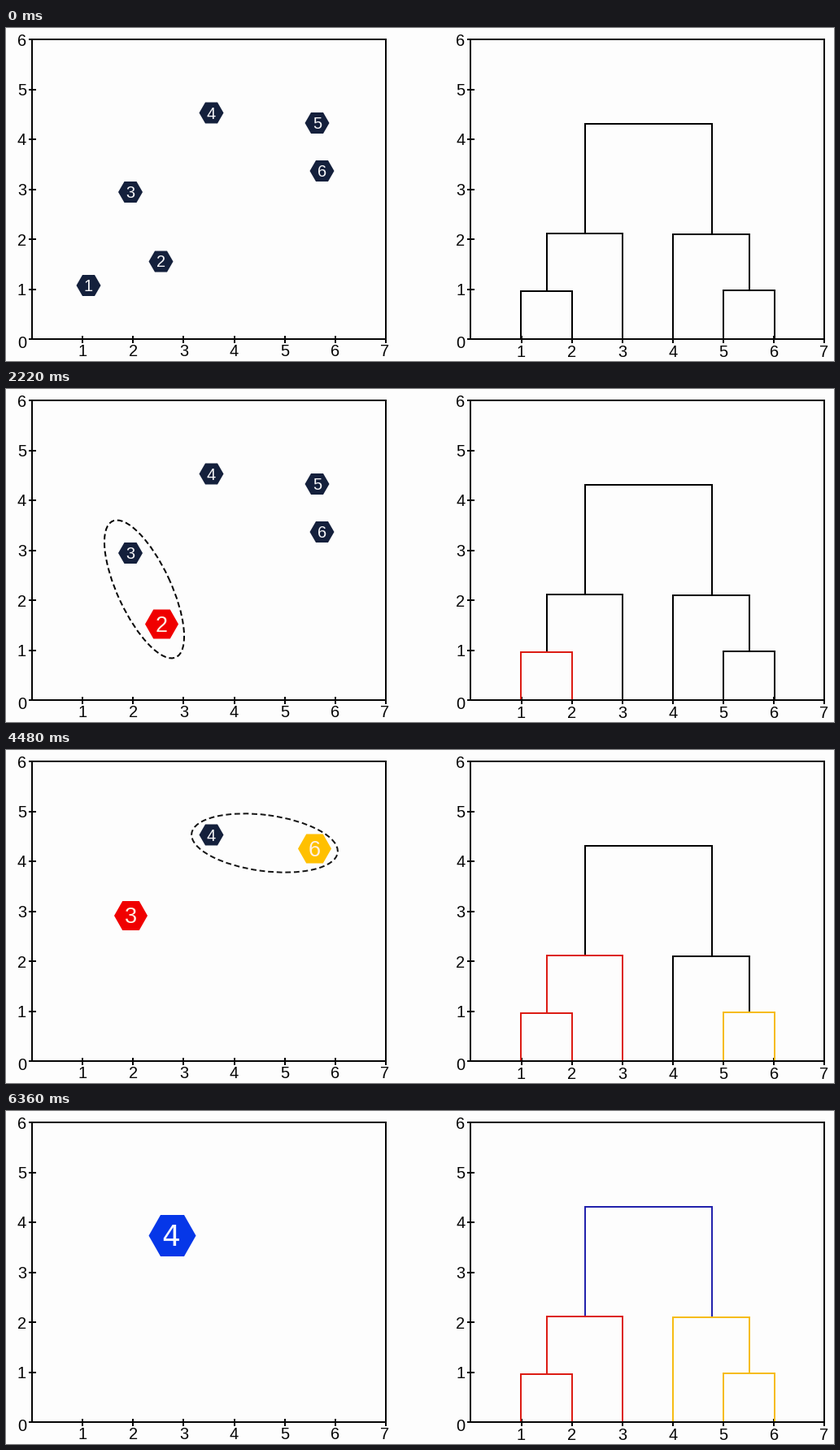
These frames come from a looping animation (1018 px wide and 410 px high, 6.96 s). A matplotlib script:

```python
import numpy as np
import matplotlib.pyplot as plt
from matplotlib.animation import FuncAnimation
from matplotlib.colors import to_rgb
from matplotlib.patches import Ellipse, Polygon

W, H, DPI = 1018, 410, 64
STEP, LOOP = 20, 6960
PX = 72 / DPI  # points per pixel

PAPER, INK = "#fdfdfd", "#050505"
DARK, RED, ORANGE, BLUE = "#14203c", "#f00000", "#ffc000", "#0637e8"
RED_LINE, ORANGE_LINE, BLUE_LINE = "#dc1c14", "#f6bc14", "#2222ac"

# (start, end) in ms
RINGS_IN = [(680, 1000), (1880, 2220), (3060, 3360), (4200, 4500), (5360, 5680)]
MERGES = [(1180, 1860), (2360, 3040), (3500, 4180), (4640, 5240), (5860, 6360)]

fig = plt.figure(figsize=(W / DPI, H / DPI), dpi=DPI, facecolor=PAPER)
ax = fig.add_axes([0, 0, 1, 1])
ax.set_xlim(0, W)
ax.set_ylim(H, 0)
ax.axis("off")


def label(x, y, text, size, color, z=2, font="Liberation Sans"):
    return ax.text(x, y + 0.35 * size, text, fontsize=size * PX, color=color,
                   family=font, ha="center", va="baseline", zorder=z)


def chart_frame(left, x_label_y):
    right, top, bottom = left + 435, 14, 383
    xs, ys = [left, right, right, left, left], [top, top, bottom, bottom, top]
    for k in range(7):
        y = bottom - 61.5 * k
        xs += [np.nan, left - 4, left + 5]
        ys += [np.nan, y, y]
        label(left - 12.5, y + (4 if k == 0 else 0.5), str(k), 20, INK)
    for k in range(1, 8):
        x = left + 62.15 * k
        xs += [np.nan, x, x]
        ys += [np.nan, bottom - 4, bottom + 5]
        label(x - (1 if k == 7 else 0), x_label_y, str(k), 20, INK)
    ax.plot(xs, ys, color=INK, lw=2 * PX, solid_capstyle="butt",
            solid_joinstyle="miter", zorder=1)


def bracket(x0, y0, top, x1, y1, z):
    return ax.plot([x0, x0, x1, x1], [y0, top, top, y1], color="black",
                   lw=2 * PX, solid_joinstyle="miter",
                   solid_capstyle="butt", zorder=z)[0]


class Hexagon:
    def __init__(self, x, y, text, born, dies, color=DARK, size=(30, 26),
                 font_px=20, ink="#f8f8fa", font="Liberation Sans", dx=0):
        w, h = size[0] / 2, size[1] / 2
        z = 4 if born is None else 6 + born
        corners = [(x - w, y), (x - w / 2, y - h), (x + w / 2, y - h),
                   (x + w, y), (x + w / 2, y + h), (x - w / 2, y + h)]
        self.parts = [ax.add_patch(Polygon(corners, fc=color, ec="none", zorder=z)),
                      label(x + dx, y, text, font_px, ink, z + 0.5, font)]
        self.born, self.dies = born, dies

    def update(self, prog):
        alpha = 1 if self.born is None else fade_in(prog[self.born])
        if self.dies is not None:
            alpha *= fade_out(prog[self.dies])
        show(self.parts, alpha)


def big(x, y, text, born, dies, color):
    return Hexagon(x, y, text, born, dies, color, (41, 36), 27, "#fff0e4")


def ring(x, y, a, b, angle):
    return ax.add_patch(Ellipse((x, y), 2 * a, 2 * b, angle=angle, fill=False,
                                ec=INK, lw=2 * PX, ls=(0, (3.4, 1.9)), zorder=3))


def show(parts, alpha):
    for p in parts:
        p.set_visible(alpha > 0.004)
        p.set_alpha(alpha)


def progress(t, span):
    start, end = span
    return min(1, max(0, (t - start + STEP) / (end - start + STEP)))


def fade_in(p):
    return np.sin(np.pi / 2 * p)


def fade_out(p):
    return (1 - p) ** 2.5


chart_frame(32, 397)
chart_frame(571.4, 398)

# one bracket per merge, in merge order
brackets = [bracket(633, 382, 324, 696, 382, 2.5),
            bracket(665, 324, 253, 758, 382, 2.4),
            bracket(882, 382, 323, 945, 382, 2.5),
            bracket(820, 382, 254, 914, 323, 2.4),
            bracket(712, 253, 118, 868, 254, 2.3)]
line_colors = [np.array(to_rgb(c)) for c in
               (RED_LINE, RED_LINE, ORANGE_LINE, ORANGE_LINE, BLUE_LINE)]

rings = [ring(143, 306, 84, 42.7, -21.9),
         ring(170, 246.5, 92.4, 32.9, 65.1),
         ring(388, 153, 74.2, 27.4, 85.5),
         ring(318, 114.5, 90.5, 34.5, 7.5),
         ring(203.5, 153.5, 101, 46, -43)]

hexagons = [Hexagon(101.5, 317, "1", None, 0),
            Hexagon(190.5, 287.5, "2", None, 0),
            Hexagon(153, 202, "3", None, 1),
            Hexagon(252.5, 104.5, "4", None, 3),
            Hexagon(382.5, 117, "5", None, 2),
            Hexagon(388.5, 176, "6", None, 2),
            big(191.5, 289.5, "2", 0, 1, RED),
            big(153.5, 204, "3", 1, 4, RED),
            big(379.5, 121.5, "6", 2, 3, ORANGE),
            big(256.5, 104.5, "4", 3, 4, ORANGE),
            Hexagon(204.5, 153.5, "4", 4, None, BLUE, (58, 51), 36,
                    "#f4f8ff", "DejaVu Sans", dx=-2)]


def update(frame):
    t = frame * STEP
    prog = [progress(t, m) for m in MERGES]
    for h in hexagons:
        h.update(prog)
    for r, span, p in zip(rings, RINGS_IN, prog):
        show([r], progress(t, span) * fade_out(p))
    for line, color, p in zip(brackets, line_colors, prog):
        line.set_color(tuple(color * min(1, 1.1 * p)))
    return []


anim = FuncAnimation(fig, update, frames=LOOP // STEP, interval=STEP,
                     init_func=lambda: update(0), repeat=True, repeat_delay=0,
                     blit=False)
plt.show()
```
